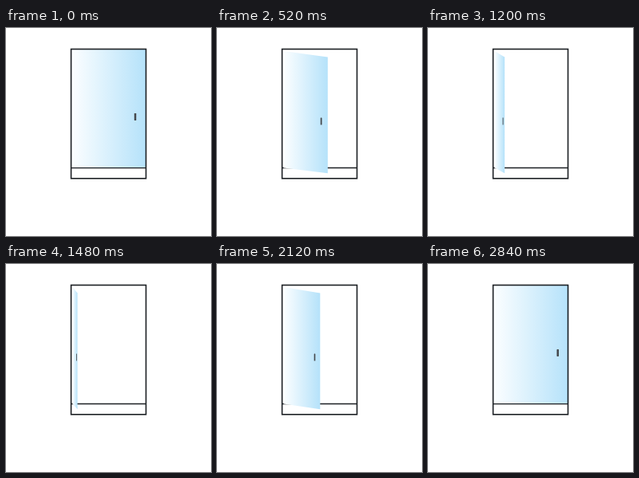
Recreate the animation shown at these times as an HTML page. Size 257 by 261 pixels, loop 2880 ms.

```html
<!DOCTYPE html>
<html lang="en">
<head>
<meta charset="utf-8">
<title>Swinging glass door</title>
<style>
  html, body { margin: 0; width: 100%; height: 100%; overflow: hidden; background: #fff; }
  svg { display: block; width: 100%; height: 100%; }
</style>
</head>
<body>
<svg viewBox="0 0 257 261">
  <defs>
    <linearGradient id="glass">
      <stop offset="0" stop-color="#fcfeff"/>
      <stop offset="1" stop-color="#b5e2fa"/>
    </linearGradient>
  </defs>
  <path d="M82 175.5H175" stroke="#1c2024" stroke-width="1.6"/>
  <path id="door" fill="url(#glass)"/>
  <rect id="handle" fill="#45484c"/>
  <rect x="81.6" y="26.5" width="93.9" height="162.3" fill="none" stroke="#1c2024" stroke-width="1.6"/>
</svg>
<script>
const LOOP = 2880, STEP = 40;
const HINGE = 82, WIDTH = 94;
// [time in ms, x of the door's free edge]
const swing = [[0, 175.5], [560, 136], [1120, 100.5], [1400, 85], [1680, 101], [2240, 137], [2840, 176.3]];
const door = document.getElementById("door");
const handle = document.getElementById("handle");

function edgeAt(time) {
  const i = Math.max(1, swing.findIndex(([t]) => t >= time));
  const [t0, x0] = swing[i - 1], [t1, x1] = swing[i];
  return x0 + (x1 - x0) * (time - t0) / (t1 - t0);
}

function draw(now) {
  const edge = edgeAt(Math.floor(now % LOOP / STEP) * STEP);
  const open = (edge - HINGE) / WIDTH;
  // The perspective slant reaches its full size early in the swing.
  const slant = Math.min(1, Math.max(0, (0.99 - open) * 4));
  const top = 27 + 9.5 * slant, bottom = 174.8 + 7.5 * slant;
  const left = HINGE + 1.5 * slant;
  door.setAttribute("d",
    `M${left} ${27 + 2 * slant}L${edge} ${top}V${bottom}L${left} ${174.8 + 0.7 * slant}Z`);

  const thickness = 0.7 + 1.8 * open;
  const box = {
    x: HINGE + 0.856 * (edge - HINGE) - thickness / 2,
    y: 107 + 5.6 * slant,
    width: thickness,
    height: 9,
    rx: thickness / 4
  };
  for (const key in box) handle.setAttribute(key, box[key]);
  requestAnimationFrame(draw);
}

const start = performance.now();
function tick(now) { draw(Math.max(0, now)); }
requestAnimationFrame(tick);
</script>
</body>
</html>
```
